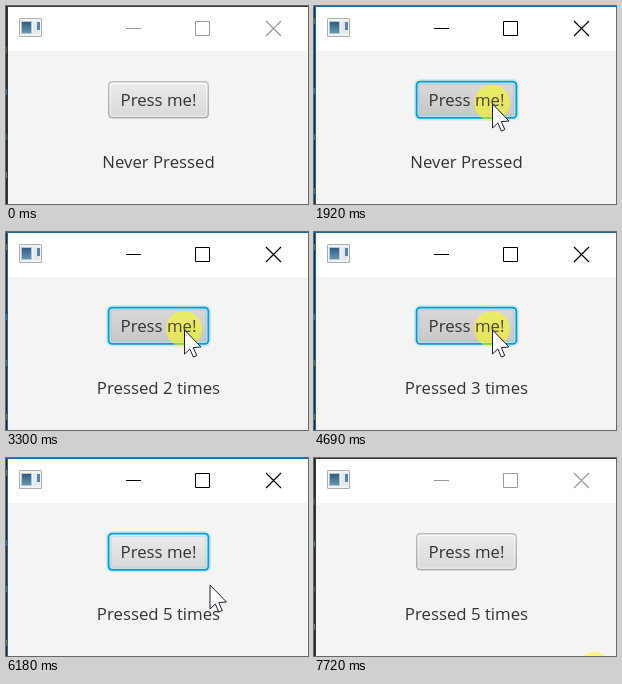
Recreate the animation shown at these times as an HTML page with a canvas. Size 302 by 198 pixels, loop 7.95 s.

```html
<!DOCTYPE html>
<html lang="en">
<head>
<meta charset="utf-8">
<title>Press counter</title>
<style>
html, body { margin: 0; width: 100%; height: 100%; overflow: hidden; background: #f4f4f4; }
canvas { display: block; width: 302px; height: 198px; }
</style>
</head>
<body>
<canvas id="stage" width="302" height="198"></canvas>
<script>
const ctx = document.getElementById('stage').getContext('2d');
const W = 302, H = 198, LOOP = 7950;
const FONT = '16.8px "Open Sans", "Noto Sans", sans-serif';
const PRESSES = [[1830, 2060], [2600, 2820], [3300, 3530], [4690, 4940], [5480, 5710]];
const REST = [178, 97];
const OUTSIDE = [229, 155];
const BUTTON = { x: 102, y: 75, w: 101, h: 37.5 };

const lerp = (a, b, p) => a + (b - a) * p;
const between = (a, b, p) => [lerp(a[0], b[0], p), lerp(a[1], b[1], p)];

function rect(x, y, w, h, color) {
  ctx.fillStyle = color;
  ctx.fillRect(x, y, w, h);
}

function round(x, y, w, h, r, fill) {
  ctx.beginPath();
  ctx.roundRect(x, y, w, h, r);
  ctx.fillStyle = fill;
  ctx.fill();
}

function gradient(y0, y1, top, bottom) {
  const g = ctx.createLinearGradient(0, y0, 0, y1);
  g.addColorStop(0, top);
  g.addColorStop(1, bottom);
  return g;
}

function text(str, y) {
  ctx.font = FONT;
  ctx.textAlign = 'center';
  ctx.textBaseline = 'alphabetic';
  ctx.fillStyle = '#333';
  ctx.fillText(str, 152.5, y);
}

function disc(x, y, alpha) {
  ctx.beginPath();
  ctx.arc(x, y, 18, 0, Math.PI * 2);
  ctx.fillStyle = `rgba(255,255,0,${alpha})`;
  ctx.fill();
}

// Pointer tip at time t, or null while it is off the window
function pointerAt(t) {
  if (t < 1000 || t >= 6700) return null;
  if (t < 1520) {
    const p = Math.floor((t - 1000) / 74.3) / 7;
    return between([223, 184], REST, 1 - (1 - p) ** 1.6);
  }
  if (t < 6180) return REST;
  if (t < 6240) return between(REST, OUTSIDE, 0.5);
  if (t < 6380) return OUTSIDE;
  const p = (Math.floor((t - 6380) / 64) + 1) / 6;
  return between(OUTSIDE, [254, 199], p);
}

function drawFrame(active) {
  const edge = active ? '#1b6da3' : '#37393c';
  rect(0, 0, W, H, '#f4f4f4');
  rect(2, 1, W - 2, 44, '#fff');
  rect(0, 0, 1, H, '#252628');
  rect(1, 0, 1, H, edge);
  rect(0, 0, W, 1, edge);
  const marks = active
    ? [[12, '#77732c'], [82, '#2d6f9c'], [128, '#4c7a3a'], [182, '#77732c']]
    : [[41, '#5d5030'], [83, '#3f7298'], [128, '#3c5a3c'], [166, '#777']];
  for (const [y, color] of marks) rect(0, y, 1, 6, color);
}

function drawIcon() {
  round(13, 12, 23, 19, 1.5, '#a9adb1');
  rect(14, 13, 21, 17, '#f1f3f5');
  rect(15, 15, 11, 13, '#b9c6cf');
  rect(16, 16, 9, 11, gradient(16, 27, '#2f5b82', '#6796b0'));
  rect(27, 15, 7, 13, '#e4e9ed');
  rect(31, 16, 3, 8, '#5584ab');
}

function drawControls(active) {
  ctx.strokeStyle = active ? '#000' : '#999';
  ctx.lineWidth = 1;
  ctx.beginPath();
  ctx.moveTo(120, 22.5);
  ctx.lineTo(135, 22.5);
  ctx.rect(189.5, 15.5, 14, 14);
  ctx.stroke();
  ctx.lineWidth = 1.2;
  ctx.beginPath();
  ctx.moveTo(260, 15);
  ctx.lineTo(275, 30);
  ctx.moveTo(275, 15);
  ctx.lineTo(260, 30);
  ctx.stroke();
}

function drawButton(focused, hover, down) {
  const { x, y, w, h } = BUTTON;
  const layer = (inset, r, fill) =>
    round(x + inset, y + inset, w - inset * 2, h - inset * 2, r, fill);
  const [top, bottom] = down ? ['#dadada', '#c6c6c6']
    : hover ? ['#f4f4f4', '#e5e5e5'] : ['#ebebeb', '#d9d9d9'];
  const body = gradient(y, y + h, top, bottom);
  const rim = down ? '#e4e4e4' : gradient(y, y + h, '#fdfdfd', '#e6e6e6');

  if (focused) {
    layer(-0.3, 4.5, '#039ed3');
    layer(1.5, 3, rim);
    layer(3, 1.5, body);
    layer(-2.1, 6, 'rgba(3,158,211,.14)');
    layer(3.9, 1.5, body);
  } else {
    round(x, y + 1, w, h, 4.5, '#fafafa');
    layer(0, 4.5, gradient(y, y + h, '#bcbcbc', '#acacac'));
    layer(1.5, 3, rim);
    layer(3, 1.5, body);
  }
}

function drawPointer([x, y]) {
  const shape = [[0, 0], [0, 24], [5.3, 19], [8.9, 27], [12.3, 25.6], [8.8, 17.6], [16.5, 17]];
  ctx.beginPath();
  for (const [dx, dy] of shape) ctx.lineTo(x + dx + 0.5, y + dy + 1);
  ctx.closePath();
  ctx.fillStyle = '#fff';
  ctx.fill();
  ctx.strokeStyle = '#1d1d35';
  ctx.lineWidth = 1;
  ctx.stroke();
}

function draw(t) {
  const active = t >= 1920 && t < 7720;
  const focused = t >= 1830 && t < 7720;
  const down = PRESSES.some(([a, b]) => t >= a && t < b);
  const count = PRESSES.filter(([, b]) => t >= b).length;
  const tip = pointerAt(t);
  const hover = !!tip && tip[0] >= 102 && tip[0] < 203 && tip[1] >= 75 && tip[1] < 113;

  drawFrame(active);
  drawIcon();
  drawControls(active);
  drawButton(focused, hover, down);
  if (down) disc(...REST, 0.45);
  text('Press me!', 100);
  if (down) disc(...REST, 0.1);
  text(count ? `Pressed ${count} times` : 'Never Pressed', 162);
  if (t >= 7720) disc(280, 212, 0.5);
  if (tip) drawPointer(tip);
}

const start = performance.now();
function tick() {
  draw((performance.now() - start) % LOOP);
  requestAnimationFrame(tick);
}
tick();
</script>
</body>
</html>
```
